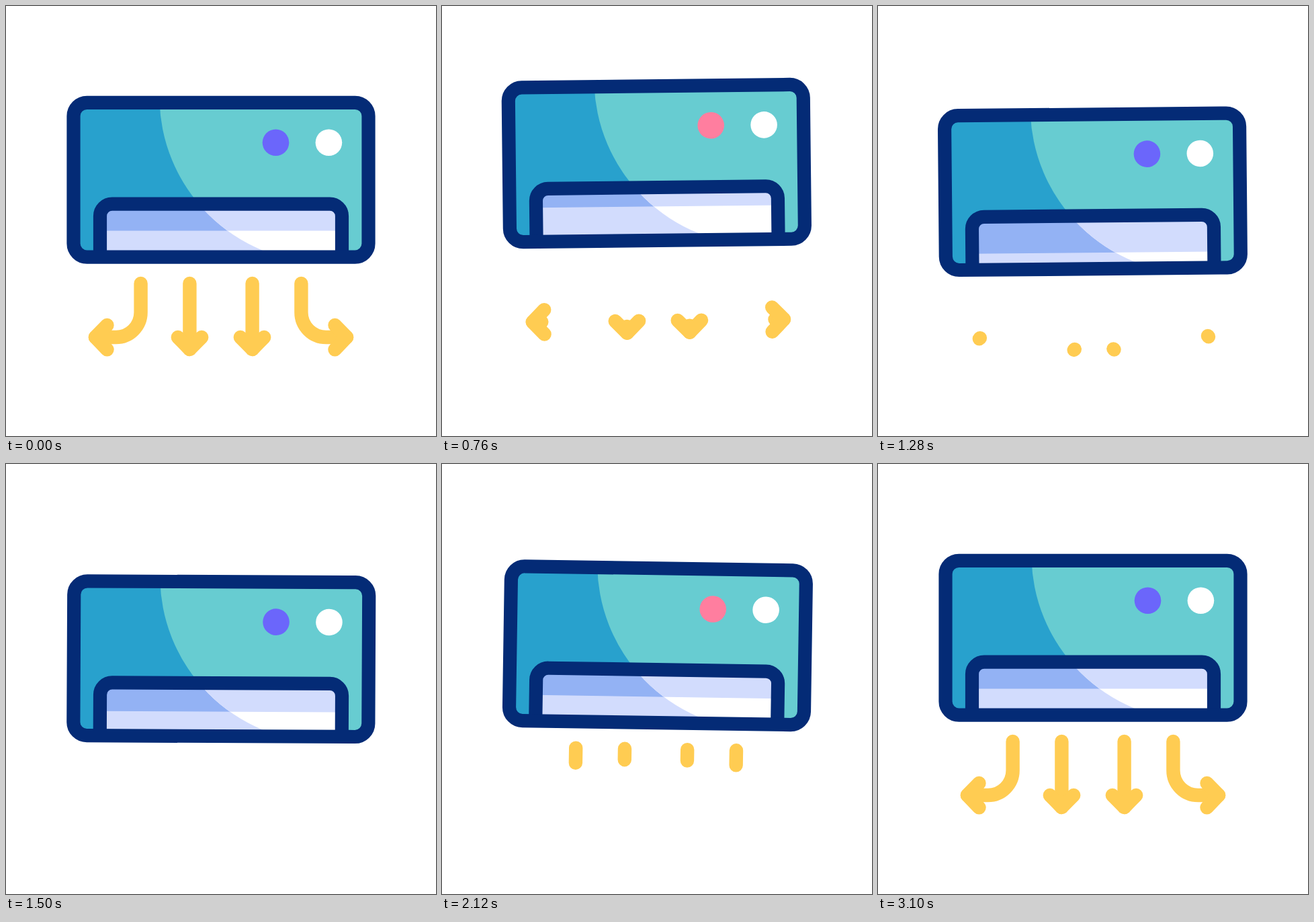
Animation of 640x640 px, one loop 3460 ms. Source, as an HTML page:

```html
<!DOCTYPE html>
<html lang="en">
<head>
<meta charset="utf-8">
<title>Air conditioner</title>
<style>
  html, body { margin: 0; width: 100%; height: 100%; overflow: hidden; background: #fff; }
  svg { display: block; width: 100vw; height: 100vh; }
</style>
</head>
<body>
<svg viewBox="0 0 640 640">
  <defs>
    <clipPath id="shell"><rect x="100.5" y="143.8" width="439" height="229.8" rx="20"/></clipPath>
    <clipPath id="lit"><circle cx="475.7" cy="134.9" r="247.3"/></clipPath>
    <clipPath id="vent"><rect x="140" y="294.7" width="360" height="78.9" rx="18"/></clipPath>
    <g id="arrows">
      <path class="shaft" pathLength="1" d="M200.6 413V456A37 37 0 0 1 163.6 493H133"/>
      <path class="head" pathLength="1" d="M150.5 511.3L132.8 493L150.5 475"/>
      <path class="shaft" pathLength="1" d="M273.4 413V511"/>
      <path class="head" pathLength="1" d="M255.8 493L273.4 511L291.2 493"/>
    </g>
  </defs>
  <g id="unit">
    <g clip-path="url(#shell)">
      <rect x="90" y="133" width="460" height="251" fill="#28a1cd"/>
      <circle cx="475.7" cy="134.9" r="247.3" fill="#67ccd1"/>
    </g>
    <g clip-path="url(#vent)">
      <rect x="140" y="290" width="360" height="84" fill="#d2dcfd"/>
      <rect class="slat" x="140" y="290" width="360" fill="#93b2f4"/>
      <g clip-path="url(#lit)">
        <rect x="140" y="290" width="360" height="84" fill="#fff"/>
        <rect class="slat" x="140" y="290" width="360" fill="#d2dcfd"/>
      </g>
    </g>
    <g fill="none" stroke="#042b76" stroke-width="20.2">
      <path d="M140 373.5V312.7A18 18 0 0 1 158 294.7H482A18 18 0 0 1 500 312.7V373.5"/>
      <rect x="100.5" y="143.8" width="439" height="229.8" rx="20"/>
    </g>
    <circle id="lamp" cx="401.5" cy="203.3" r="19.8"/>
    <circle cx="480.4" cy="203.3" r="19.8" fill="#fff"/>
    <g fill="none" stroke="#ffcc52" stroke-width="20.4" stroke-linecap="round" stroke-linejoin="round">
      <use href="#arrows"/>
      <use href="#arrows" transform="matrix(-1 0 0 1 640 0)"/>
    </g>
  </g>
</svg>
<script>
const LOOP = 3460;
const unit = document.getElementById('unit');
const lamp = document.getElementById('lamp');
const all = selector => [...document.querySelectorAll(selector)];
const slats = all('.slat'), shafts = all('.shaft'), heads = all('.head');

// Eased curve from (0,0) to (1,1) with horizontal ends; x1 and x2 are the handle positions.
function bezier(x1, x2) {
  return x => {
    let lo = 0, hi = 1;
    for (let i = 0; i < 24; i++) {
      const s = (lo + hi) / 2, r = 1 - s;
      if (3 * r * r * s * x1 + 3 * r * s * s * x2 + s * s * s < x) lo = s; else hi = s;
    }
    return lo * lo * (3 - 2 * lo);
  };
}
const sine = x => (1 - Math.cos(Math.PI * x)) / 2;
const progress = (t, from, to) => sine(Math.min(1, Math.max(0, (t - from) / (to - from))));

// Keys are [time, value, easing towards this key].
function track(keys, t) {
  if (t <= keys[0][0]) return keys[0][1];
  for (let i = 1; i < keys.length; i++) {
    const [t0, v0] = keys[i - 1], [t1, v1, ease = sine] = keys[i];
    if (t < t1) return v0 + (v1 - v0) * ease((t - t0) / (t1 - t0));
  }
  return keys[keys.length - 1][1];
}

const lift = [[100, 0], [750, -24.7, bezier(.5, .7)], [1550, 32], [3000, 0, bezier(.33, .2)]];
const tilt = [[380, 0], [1020, -.97], [1840, .98], [3100, 0]];
const slatEdge = [[60, 334.5], [620, 319.6], [1260, 349.6], [1800, 319.6], [2430, 349.6], [3060, 334.5]];

function trim(paths, start, end) {
  const length = end - start;
  for (const path of paths) {
    path.setAttribute('visibility', length > .002 ? 'visible' : 'hidden');
    path.setAttribute('stroke-dasharray', `${length} 2`);
    path.setAttribute('stroke-dashoffset', -start);
  }
}

function render(t) {
  unit.setAttribute('transform', `translate(0 ${track(lift, t)}) rotate(${track(tilt, t)} 320 320)`);
  const edge = track(slatEdge, t);
  for (const slat of slats) slat.setAttribute('height', edge - 290);

  const pink = (t >= 450 && t < 1050) || (t >= 1650 && t < 2250);
  lamp.setAttribute('fill', pink ? '#ff7e9f' : '#6b66fb');

  if (t < 1600) {
    trim(shafts, progress(t, 190, 910), 1);
    trim(heads, progress(t, 860, 1335), 1);
  } else {
    trim(shafts, 0, progress(t, 1930, 2640));
    trim(heads, 0, progress(t, 2520, 3060));
  }
}

const began = performance.now();
function tick() {
  render((performance.now() - began) % LOOP);
  requestAnimationFrame(tick);
}
tick();
</script>
</body>
</html>
```
